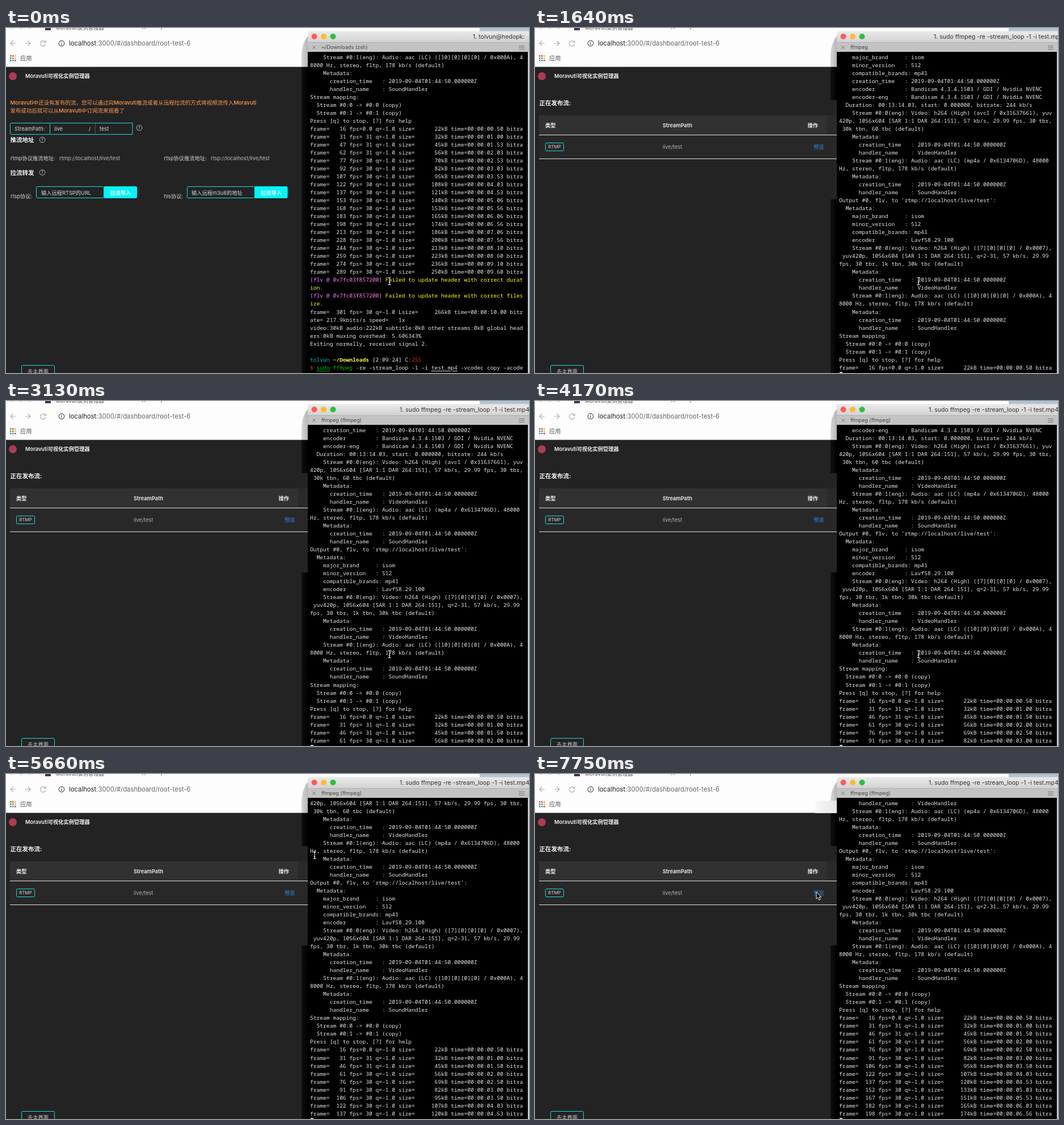
An HTML page for the animation above (8 s loop, 922 by 608 pixels).

```html
<!DOCTYPE html>
<html lang="zh-CN">
<head>
<meta charset="utf-8">
<title>Stream console</title>
<style>
html, body { margin: 0; width: 100%; height: 100%; overflow: hidden; background: #232323; }
#stage { position: relative; width: 922px; height: 608px; overflow: hidden; }
svg { position: absolute; left: 0; top: 0; }
text { font: 9.25px Inter, "Noto Sans CJK SC", "Noto Sans CJK", sans-serif; fill: #d4d4d4; white-space: pre; }
.b { font-weight: 600; fill: #f2f2f2; }
.h { font-size: 10.5px; }
.mid { text-anchor: middle; }
.warn { font-size: 9.5px; font-weight: 500; fill: #ff9d4f; }
.box { fill: none; stroke: #14e0e4; }
.icon { fill: none; stroke: #c8c8c8; }
.bar { font-size: 10.5px; fill: #333; }
.tab { font-size: 9.1px; fill: #444; }
#term {
  position: absolute; left: 536px; top: 44.5px; width: 383px; height: 563.5px; margin: 0;
  overflow: hidden; color: #e6e6e6; white-space: pre;
  font: 500 9.642px/14.03px "Noto Sans Mono", "DejaVu Sans Mono", monospace;
  font-variant-ligatures: none;
}
#term b { color: #ffff3c; }
#term u { text-underline-offset: 1.5px; }
.m { color: #ff77ff; } .y { color: #ffff00; } .c { color: #00c5c7; } .g { color: #00c200; } .r { color: #e02a1d; }
#caret { position: absolute; left: 537px; top: 606px; width: 5px; height: 2px; background: #c7c7c7; }
</style>
</head>
<body>
<div id="stage">
<svg width="922" height="608" viewBox="0 0 922 608">
  <defs>
    <linearGradient id="title" x2="0" y2="1"><stop stop-color="#eaeaea"/><stop offset="1" stop-color="#d2d2d2"/></linearGradient>
    <linearGradient id="edge"><stop stop-color="#111"/><stop offset="1" stop-color="#000"/></linearGradient>
    <linearGradient id="shade"><stop stop-color="#d8d8d8"/><stop offset="1" stop-color="#b5b5b5"/></linearGradient>
    <linearGradient id="fade"><stop stop-color="#f8f8f8"/><stop offset="1" stop-color="#e6e6e6"/></linearGradient>
    <g id="help"><circle class="icon" r="4.8" stroke-width=".9"/><text class="mid" y="2.6" style="font-size:7.5px">?</text></g>
  </defs>

  <!-- browser chrome -->
  <rect width="922" height="69" fill="#fdfdfd"/>
  <rect x="835" width="87" height="8" fill="#b4c3cf"/>
  <g fill="#d9d9d9"><circle cx="10" cy="-3" r="4.5"/><circle cx="26" cy="-3" r="4.5"/><circle cx="42" cy="-3" r="4.5"/></g>
  <rect x="69" y="-6" width="10" height="10" fill="#4b2a5a"/>
  <text x="88" y="2.5" style="fill:#555">Moravuti实例管理器</text>
  <path d="M240-4l6 6m0-6l-6 6M274-3v6" stroke="#666" fill="none"/>
  <g fill="none" stroke-width="1.2">
    <path d="M17 27H8m4.5-4.5L8 27l4.5 4.5" stroke="#aaa"/>
    <path d="M34 27h9m-4.5-4.5L43 27l-4.5 4.5" stroke="#aaa"/>
    <path d="M69 24.5a4.7 4.7 0 1 0 .8 4M70 22v3.5h-3.5" stroke="#aaa"/>
    <circle cx="98" cy="27" r="4.8" stroke="#555"/>
    <path d="M98 24.2v1.2m0 1.2v3.5" stroke="#555"/>
  </g>
  <text x="111" y="31" style="font-size:11.3px;fill:#666"><tspan fill="#222">localhost</tspan>:3000/#/dashboard/root-test-6</text>
  <g id="apps"></g>
  <text x="25" y="57" style="font-size:10.3px;fill:#555">应用</text>
  <path d="M532 14Q521 28 521 48V69H532Z" fill="url(#shade)"/>

  <!-- page -->
  <rect y="68.5" width="532" height="540" fill="#232323"/>
  <rect x="521" y="69" width="11" height="539" fill="url(#edge)"/>
  <circle cx="12" cy="85" r="7" fill="#b03a52"/>
  <text class="b" x="34" y="88.3">Moravuti可视化实例管理器</text>
  <rect class="box" x="27.5" y="594.5" width="58" height="22" rx="2"/>
  <text class="mid" x="56.5" y="608.5">去主界面</text>

  <g id="form">
    <text class="warn" x="7.5" y="135.3">Moravuti中还没有发布的流，您可以通过向Moravuti推流或者从远程拉流的方式将视频流传入Moravuti</text>
    <text class="warn" x="7.5" y="149.3">发布成功后就可以从Moravuti中订阅流来观看了</text>
    <path d="M157.5 168v19" stroke="#555"/>
    <rect class="box" x="7.5" y="167.5" width="70" height="20" rx="2"/>
    <path class="box" d="M77.5 167.5H223V187.5H77.5"/>
    <text x="15" y="180.5">StreamPath:</text><text x="85" y="180.5">live</text><text x="146" y="180.5">/</text><text x="165" y="180.5">test</text>
    <use href="#help" x="235" y="176"/>
    <text class="b h" x="7.5" y="201">推流地址</text><use href="#help" x="64" y="197"/>
    <text x="8" y="232.5">rtmp协议推流地址:</text><text x="94" y="232.5" style="fill:#bbb">rtmp://localhost/live/test</text>
    <text x="278.5" y="232.5">rtsp协议推流地址:</text><text x="361" y="232.5" style="fill:#bbb">rtsp://localhost/live/test</text>
    <text class="b h" x="7.5" y="258.5">拉流转发</text><use href="#help" x="64" y="254.5"/>
    <text x="8" y="300">rtsp协议:</text><text x="278.5" y="300">hls协议:</text>
    <rect class="box" x="53.5" y="279.5" width="119" height="20" rx="2"/><rect x="172.5" y="279" width="58.5" height="21" rx="2" fill="#00f5fa"/>
    <rect class="box" x="319.5" y="279.5" width="119" height="20" rx="2"/><rect x="438" y="279" width="58.5" height="21" rx="2" fill="#00f5fa"/>
    <text x="62" y="293.5">输入远程RTSP的URL</text><text x="327" y="293.5">输入远程m3u8的地址</text>
    <text class="b mid" x="202" y="293.5">拉流导入</text><text class="b mid" x="467.5" y="293.5">拉流导入</text>
  </g>

  <g id="list">
    <rect x="521" y="127" width="11" height="175" fill="#242424"/>
    <text class="b h" x="7.5" y="136">正在发布流:</text>
    <rect x="7" y="154" width="508" height="34" fill="#313131"/><rect x="515" y="154" width="17" height="34" fill="#2a2a2a"/>
    <rect x="7" y="189" width="525" height="41" fill="#282828"/>
    <path d="M7 188.5H532M7 230.5H532" stroke="#e2e2e2"/>
    <text class="b" x="18" y="174.7">类型</text><text class="b" x="225" y="174.7">StreamPath</text><text class="b" x="480.5" y="174.7">操作</text>
    <rect class="box" x="18.5" y="202.5" width="32" height="14" rx="2"/>
    <text class="mid" x="34.5" y="212.2" style="font-size:7.9px">RTMP</text>
    <text x="225" y="212.7" style="fill:#b0b0b0">live/test</text>
    <text x="491" y="212.7" style="fill:#2d8cf0">预览</text>
  </g>
  <rect id="patch" y="47" height="22" fill="url(#fade)"/>

  <!-- terminal window -->
  <path d="M532 25V11Q532 5.500 537 5.500H922V25Z" fill="url(#title)"/>
  <rect x="532" y="25" width="390" height="17" fill="#c3c3c3"/>
  <path d="M532 25.5H922" stroke="#b0b0b0"/>
  <circle cx="543.5" cy="15" r="5" fill="#fc5b57"/><circle cx="560" cy="15" r="5" fill="#fdbc2e"/><circle cx="576.5" cy="15" r="5" fill="#28c23c"/>
  <text id="title-text" class="bar" y="18.8"></text>
  <path d="M540 31l6 6m0-6l-6 6M904 31.5h10M904 34.5h10M904 37.5h10" stroke="#777" fill="none"/>
  <text id="tab-text" class="tab" x="556" y="37.2"></text>
  <rect x="532" y="42" width="388" height="566" fill="#000"/><rect x="920" y="42" width="2" height="566" fill="#d0d0d0"/>
</svg>
<pre id="term"></pre>
<div id="caret"></div>
<svg width="922" height="608">
  <g id="mouse">
    <path id="beam" d="M-2.5-6.500Q0-6.500 0-4.500Q0-6.500 2.500-6.500M0-5V5M-2.500 6.500Q0 6.500 0 4.500Q0 6.500 2.500 6.500M-1.500 2.500h3" fill="none" stroke="#eee" stroke-width="1.1"/>
    <path id="arrow" d="M-4-6V6L-1.300 3.500L.7 8L3 7L1 2.700H4.700Z" fill="#000" stroke="#fff"/>
  </g>
</svg>
</div>
<script>
const LOOP = 8000, COLS = 65, ROWS = 40;
const $ = id => document.getElementById(id);

const dots = ["#ea4335", "#ea4335", "#fbbc05", "#34a853", "#4285f4", "#fbbc05", "#34a853", "#4285f4", "#ea4335"];
$("apps").innerHTML = dots.map((fill, i) =>
  `<rect x="${7 + i % 3 * 4}" y="${48 + Math.floor(i / 3) * 4}" width="2.6" height="2.6" fill="${fill}"/>`).join("");

const progress = (pairs, fastRows) => pairs.map(([kb, sec], i) => {
  const frame = String(Math.round(sec * 30) + 1).padStart(5);
  const fps = i ? (i < fastRows ? " 31" : " 30") : "0.0";
  return `frame=${frame} fps=${fps} q=-1.0 size=${String(kb).padStart(8)}kB time=00:00:${sec.toFixed(2).padStart(5, "0")} bitra`;
});
const wrap = text => text.split("\n").flatMap(line => line.match(new RegExp(`.{1,${COLS}}`, "g")) || [""]);

const stamp = handler => `    Metadata:
      creation_time   : 2019-09-04T01:44:50.000000Z
      handler_name    : ${handler}Handler`;
const brands = `  Metadata:
    major_brand     : isom
    minor_version   : 512
    compatible_brands: mp41`;
const encoder = "Bandicam 4.3.4.1503 / GDI / Nvidia NVENC";
const size = "yuv420p, 1056x604 [SAR 1:1 DAR 264:151]";
const tail = `    Stream #0:1(eng): Audio: aac (LC) ([10][0][0][0] / 0x000A), 48000 Hz, stereo, fltp, 178 kb/s (default)
${stamp("Sound")}
Stream mapping:
  Stream #0:0 -> #0:0 (copy)
  Stream #0:1 -> #0:1 (copy)
Press [q] to stop, [?] for help`;

const flv = '<span class="m">[flv @ 0x7fc03f857200]</span> <span class="y">Failed to update header with correct ';
const before = [
  ...wrap(tail),
  ...progress([[22, .5], [32, 1], [45, 1.53], [56, 2.03], [70, 2.53], [82, 3.03], [95, 3.53], [108, 4.03], [121, 4.53],
    [140, 5.06], [153, 5.56], [165, 6.06], [174, 6.56], [186, 7.06], [200, 7.56], [213, 8.1], [223, 8.6], [236, 9.1], [250, 9.6]], 4),
  flv + "durat</span>", '<span class="y">ion.</span>',
  flv + "files</span>", '<span class="y">ize.</span>',
  ...wrap(`frame=  301 fps= 30 q=-1.0 Lsize=     266kB time=00:00:10.00 bitrate= 217.9kbits/s speed=   1x
video:30kB audio:222kB subtitle:0kB other streams:0kB global headers:0kB muxing overhead: 5.606343%
Exiting normally, received signal 2.
`),
  '<span class="c">tolvun</span> <b>~/Downloads</b> [2:09:24] C:<span class="r">255</span>',
  '<span class="r">$</span> <u class="g">sudo</u> <span class="g">ffmpeg</span> -re -stream_loop -1 -i <u>test.mp4</u> -vcodec copy -acode',
  "c copy -f flv rtmp://localhost/live/test"
];

const opening = wrap(`${brands}
    creation_time   : 2019-09-04T01:44:50.000000Z
    encoder         : ${encoder}
    encoder-eng     : ${encoder}
  Duration: 00:13:14.03, start: 0.000000, bitrate: 244 kb/s
    Stream #0:0(eng): Video: h264 (High) (avc1 / 0x31637661), ${size}, 57 kb/s, 29.99 fps, 30 tbr, 30k tbn, 60 tbc (default)
${stamp("Video")}
    Stream #0:1(eng): Audio: aac (LC) (mp4a / 0x6134706D), 48000 Hz, stereo, fltp, 178 kb/s (default)
${stamp("Sound")}
Output #0, flv, to 'rtmp://localhost/live/test':
${brands}
    encoder         : Lavf58.29.100
    Stream #0:0(eng): Video: h264 (High) ([7][0][0][0] / 0x0007), ${size}, q=2-31, 57 kb/s, 29.99 fps, 30 tbr, 1k tbn, 30k tbc (default)
${stamp("Video")}
${tail}`);
const running = progress([[22, .5], [32, 1], [45, 1.5], [56, 2], [69, 2.5], [82, 3], [95, 3.5], [107, 4.03],
  [120, 4.53], [133, 5.03], [151, 5.53], [165, 6.03], [174, 6.56]], 3);

const START = 1040, OUTPUT = 1190, PUBLISHED = 1340, RENAMED = 1940;
const lineTimes = [1640, 2240, 2680, 3130, 3730, 4170, 4620, 5210, 5660, 6110, 6700, 7150, 7600];
const path = [[0, 676, 446], [4910, 640, 352], [5060, 564, 249], [5210, 554, 215], [5360, 549, 185], [5510, 546, 160],
  [5660, 544, 143], [5810, 543, 133], [6700, 534, 158], [6850, 510, 199], [7150, 503, 208], [7300, 501, 212], [7450, 500, 214]];

function terminalRows(t) {
  if (t < START) return before;
  if (t < OUTPUT) return before.slice(-ROWS);
  return [...opening, ...running.slice(0, lineTimes.filter(at => at <= t).length)].slice(-ROWS);
}

function show(node, visible) { node.style.display = visible ? "" : "none"; }

let shown = "";
function draw(now) {
  const t = now % LOOP;
  const html = terminalRows(t).join("\n");
  if (html !== shown) $("term").innerHTML = shown = html;
  show($("caret"), t >= START);

  show($("form"), t < PUBLISHED);
  show($("list"), t >= PUBLISHED);

  const command = "1. sudo ffmpeg -re -stream_loop -1 -i test.mp4";
  $("title-text").textContent = t < START ? "1. tolvun@hedopk:" : command;
  $("title-text").setAttribute("x", t < START ? 823 : t < RENAMED ? 703 : 694);
  $("tab-text").textContent = t < START ? "~/Downloads (zsh)" : t < RENAMED ? "ffmpeg" : "ffmpeg (ffmpeg)";

  const [, x, y] = path.filter(([at]) => at <= t).pop();
  $("mouse").setAttribute("transform", `translate(${x} ${y})`);
  show($("beam"), x >= 532);
  show($("arrow"), x < 532);

  const left = t >= 7150 ? 494 : 505;
  $("patch").setAttribute("x", left);
  $("patch").setAttribute("width", 532 - left);
  show($("patch"), t >= 6850);
}

function tick() {
  draw(performance.now());
  requestAnimationFrame(tick);
}
tick();
</script>
</body>
</html>
```
